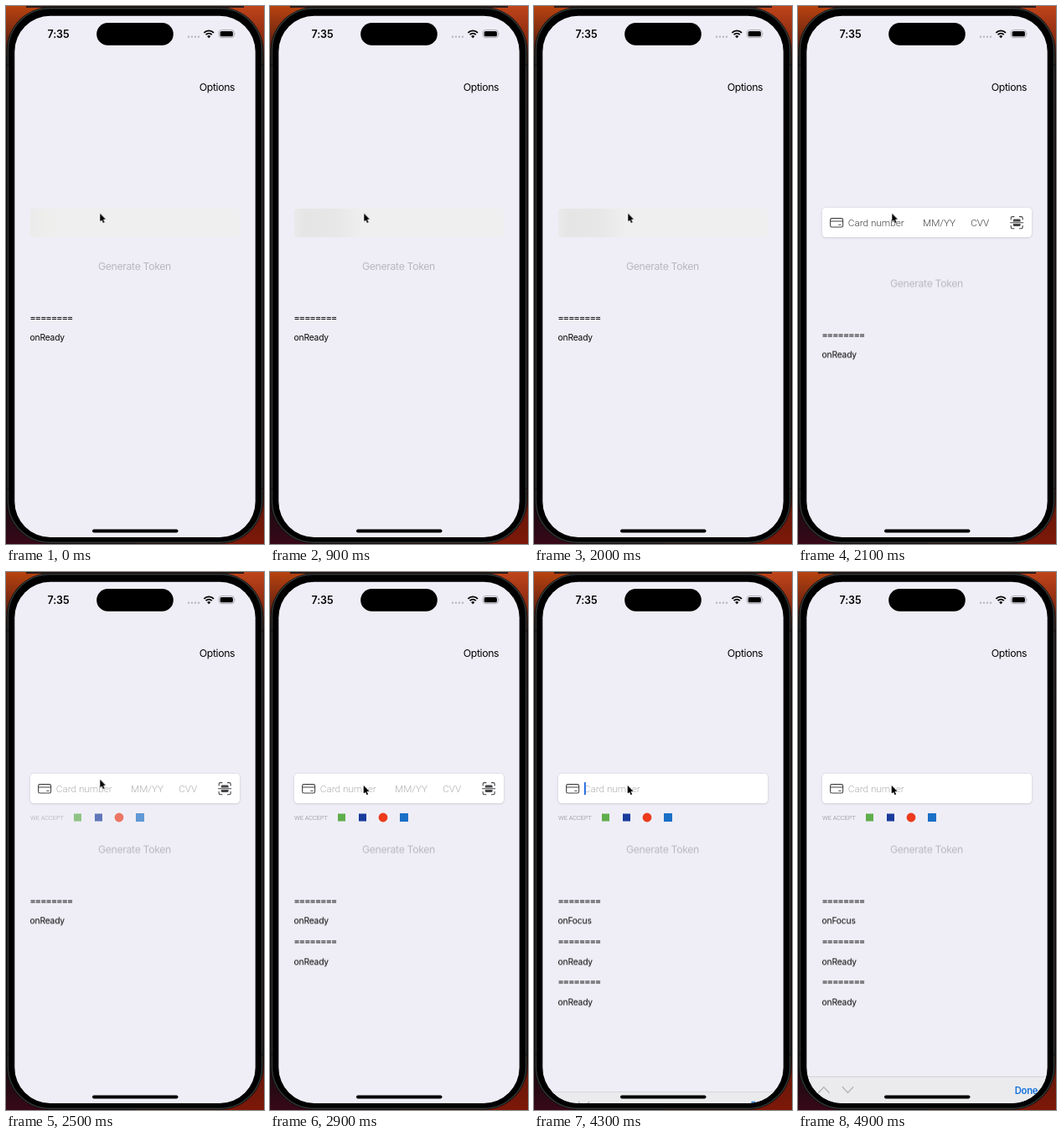
These frames come from a looping animation (308 by 640 pixels, 5000 ms). An HTML page:

```html
<!DOCTYPE html>
<html lang="en">
<head>
<meta charset="utf-8">
<title>Card form</title>
<style>
html, body { margin: 0; width: 100%; height: 100%; overflow: hidden; background: #000; }
svg { display: block; width: 100vw; height: 100vh; }
text { font-family: Inter, sans-serif; fill: #050506; white-space: pre; }
.large { font-size: 12.3px; letter-spacing: -.03em; }
.clock { font-size: 12.5px; font-weight: 600; letter-spacing: -.01em; }
.log text { font-size: 10.3px; letter-spacing: -.018em; }
.log .rule { font-size: 11.5px; letter-spacing: -.108em; }
.muted { fill: #b9b8bd; }
.hint { font: 300 11.73px Roboto, sans-serif; }
.accept { font: 300 7.4px Roboto, sans-serif; fill: #85858a; }
.done { font-size: 11.3px; font-weight: 600; letter-spacing: -.025em; fill: #1673dc; }
.icon { fill: none; stroke: #454548; stroke-width: 1.1; stroke-linecap: round; stroke-linejoin: round; }

/* One 5 s clock drives everything; hard cuts use step-end. */
.cut { animation: 5s step-end infinite; }
.ease { animation: 5s linear infinite; }
.idle { animation-name: idle; }
.sweep { animation-name: sweep; }
.card { animation-name: card; }
.below { animation-name: below; }
.second { animation-name: second; }
.blur { animation-name: blur; }
.focus { animation-name: focus; }
.hints { animation-name: hints; }
.brands { animation-name: brands; }
.pointer { animation-name: pointer; }
.caret { animation-name: caret; }
.bar { animation-name: bar; }

@keyframes idle { 0% { opacity: 1 } 10%, 100% { opacity: 0 } }
@keyframes sweep { 0% { opacity: 0 } 10% { opacity: 1 } 42%, 100% { opacity: 0 } }
@keyframes card { 0% { opacity: 0 } 42%, 100% { opacity: 1 } }
@keyframes below { 0% { transform: translateY(-20.4px) } 42%, 100% { transform: none } }
@keyframes second { 0% { opacity: 0 } 52%, 100% { opacity: 1 } }
@keyframes blur { 0% { opacity: 1 } 86%, 100% { opacity: 0 } }
@keyframes focus { 0% { opacity: 0 } 86%, 100% { opacity: 1 } }
@keyframes hints { 0%, 43% { fill: #404044 } 50%, 100% { fill: #b0b0b3 } }
@keyframes brands { 0%, 46% { opacity: 0 } 52%, 100% { opacity: 1 } }
@keyframes pointer {
  0%, 52% { transform: translate(112.3px, 246.8px); animation-timing-function: ease-in-out }
  57%, 100% { transform: translate(111.8px, 254px) }
}
@keyframes caret {
  0%, 85.99% { opacity: 0 }
  86%, 93% { opacity: 1 }
  96%, 100% { opacity: 0 }
}
@keyframes bar {
  0%, 85.99% { transform: translateY(40px) }
  86% { transform: translateY(18px); animation-timing-function: cubic-bezier(.15, .7, .3, 1) }
  93%, 100% { transform: none }
}
</style>
</head>
<body>
<svg viewBox="0 0 308 640">
  <defs>
    <linearGradient id="left" x2="0" y2="1">
      <stop offset="0" stop-color="#b8430f"/><stop offset=".05" stop-color="#7c2a10"/>
      <stop offset=".1" stop-color="#1c1312"/><stop offset=".92" stop-color="#160b10"/>
      <stop offset="1" stop-color="#380819"/>
    </linearGradient>
    <linearGradient id="right" x2="0" y2="1">
      <stop offset="0" stop-color="#c0441a"/><stop offset=".06" stop-color="#8a2c12"/>
      <stop offset=".11" stop-color="#1e1412"/><stop offset=".9" stop-color="#1c0f0d"/>
      <stop offset=".94" stop-color="#6a170a"/><stop offset="1" stop-color="#7d1809"/>
    </linearGradient>
    <linearGradient id="faint">
      <stop offset="0" stop-color="#ebebeb"/><stop offset=".07" stop-color="#eeeeed"/>
      <stop offset=".14" stop-color="#f0efef"/>
    </linearGradient>
    <linearGradient id="strong">
      <stop offset="0" stop-color="#eaeaea"/><stop offset=".05" stop-color="#e5e5e6"/>
      <stop offset=".2" stop-color="#e7e7e8"/><stop offset=".33" stop-color="#f0efef"/>
    </linearGradient>
    <filter id="soft" x="-5%" y="-20%" width="110%" height="140%">
      <feGaussianBlur stdDeviation="1.2"/>
    </filter>
    <clipPath id="screen"><rect x="10.3" y="11.7" width="287.4" height="620.3" rx="42.5"/></clipPath>
  </defs>

  <!-- desktop and phone body -->
  <rect width="154" height="640" fill="url(#left)"/>
  <rect x="154" width="154" height="640" fill="url(#right)"/>
  <path d="M24 0H284V2H24z" fill="#2a1a18"/>
  <rect x=".8" y="1.2" width="306.4" height="638.6" rx="52" fill="#0a0b0b"/>
  <rect x="2.4" y="2.8" width="303.2" height="635.4" rx="50" fill="#000" stroke="#333736" stroke-width="1.4"/>
  <path d="M0 70H3M0 574H3M305 70H308M305 574H308" stroke="#111"/>

  <g clip-path="url(#screen)">
    <rect x="10" y="11" width="288" height="622" fill="#efeef6"/>
    <text class="large" x="230.7" y="101.4">Options</text>

    <!-- loading placeholder -->
    <rect class="cut idle" x="29" y="241" width="250" height="34" rx="4" fill="url(#faint)"/>
    <rect class="cut sweep" x="29" y="241" width="250" height="34" rx="4" fill="url(#strong)"/>

    <!-- card field -->
    <g class="cut card">
      <rect x="28.6" y="240" width="250.8" height="36" rx="5" fill="#cfced6" filter="url(#soft)"/>
      <rect x="29" y="240" width="250" height="35" rx="4.5" fill="#fff"/>
      <g class="icon">
        <rect x="38.6" y="252.6" width="15" height="10.4" rx="1.8"/>
        <path d="M38.6 256H53.6M48.8 260.2H51"/>
      </g>
      <text class="hint ease hints" x="59.8" y="262">Card number</text>
      <g class="cut blur">
        <text class="hint ease hints" x="149" y="262">MM/YY</text>
        <text class="hint ease hints" x="206.2" y="262">CVV</text>
        <g class="icon">
          <path d="M254.2 254V252.3Q254.2 250.6 255.9 250.6H258M264.4 250.6H266.5Q268.2 250.6 268.2 252.3V254M268.2 261.4V263.1Q268.2 264.8 266.5 264.8H264.4M258 264.8H255.9Q254.2 264.8 254.2 263.1V261.4"/>
          <path d="M253.6 257.8H268.8"/>
        </g>
        <path d="M256.8 256.6V254.8Q256.8 253.4 258.2 253.4H264.2Q265.6 253.4 265.6 254.8V256.6zM256.8 259V260.7Q256.8 262.1 258.2 262.1H264.2Q265.6 262.1 265.6 260.7V259z" fill="#454548"/>
      </g>
      <rect class="ease caret" x="59.9" y="250" width="1.9" height="15.2" rx=".8" fill="#1f66e0"/>
    </g>

    <g class="ease brands">
      <text class="accept" x="29" y="294.7">WE ACCEPT</text>
      <rect x="81" y="287.5" width="9" height="9" fill="#5fae4c"/>
      <rect x="106" y="287.5" width="9" height="9" fill="#1a3c9c"/>
      <circle cx="135" cy="292" r="5.4" fill="#ec3a1c"/>
      <rect x="155" y="287" width="10" height="10" fill="#1a70c6"/>
    </g>

    <g class="cut below">
      <text class="large muted" x="110" y="334.8">Generate Token</text>
      <g class="log">
        <text class="rule" x="28.2" y="395.1">========</text>
        <text class="cut blur" x="28.5" y="418.8">onReady</text>
        <text class="cut focus" x="28.5" y="418.8">onFocus</text>
        <g class="cut second">
          <text class="rule" x="28.2" y="443.5">========</text>
          <text x="28.5" y="467.2">onReady</text>
        </g>
        <g class="cut focus">
          <text class="rule" x="28.2" y="491.9">========</text>
          <text x="28.5" y="515.8">onReady</text>
        </g>
      </g>
    </g>

    <!-- keyboard accessory -->
    <g class="ease bar">
      <rect x="10" y="600" width="288" height="60" fill="#ebebee"/>
      <path d="M10 600.4H298" stroke="#cbcad0" stroke-width=".8"/>
      <path d="M24.5 619.5L30.8 612.8L37.1 619.5M53.2 612.8L59.5 619.5L65.8 612.8" fill="none" stroke="#b4b4b9" stroke-width="1.3" stroke-linecap="round" stroke-linejoin="round"/>
      <text class="done" x="286.2" y="620.8" text-anchor="end">Done</text>
    </g>
    <rect x="103" y="622.4" width="102.5" height="4" rx="2"/>

    <!-- status bar -->
    <text class="clock" x="49.6" y="37.6">7:35</text>
    <rect x="108.2" y="20" width="91.6" height="26.7" rx="13.3"/>
    <path d="M218 36.6h0M222 36.6h0M226 36.6h0M230 36.6h0" stroke="#b5b4ba" stroke-width="2.4" stroke-linecap="round"/>
    <path d="M236.4 31.8a8 8 0 0 1 11.6 0M238.6 34.1a5 5 0 0 1 7.2 0" fill="none" stroke="#000" stroke-width="1.8"/>
    <path d="M242.2 38.3l-2.1-2.2a3 3 0 0 1 4.2 0z"/>
    <rect x="254.4" y="28.6" width="17.8" height="9" rx="2.7" fill="none" stroke="#98979d" stroke-width=".8"/>
    <rect x="255.7" y="29.9" width="15.2" height="6.4" rx="1.6"/>
    <path d="M273.1 31.6q1.2 1.5 0 3z" fill="#98979d"/>
  </g>

  <path class="ease pointer" d="M0 0V9.6L2.2 7.7L3.7 11.2L5.3 10.5L3.8 7.1H6.7z" stroke="#fff" stroke-width=".8" paint-order="stroke"/>
</svg>
</body>
</html>
```
